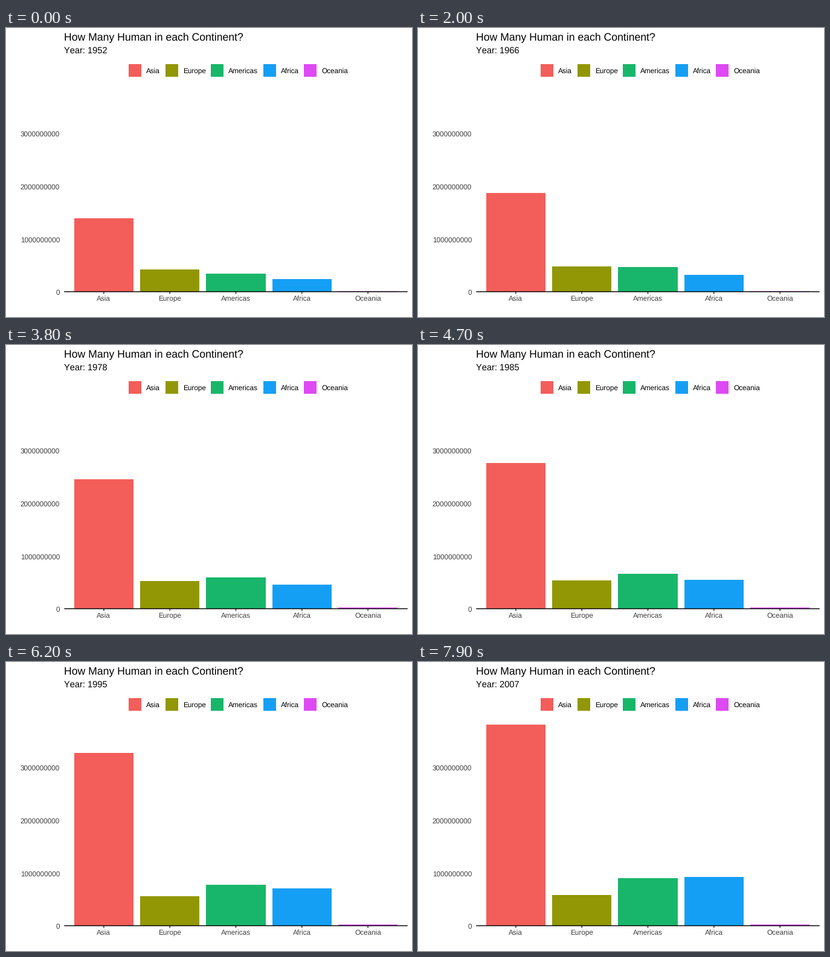
A matplotlib script for the animation above (10 s loop, 672 by 480 pixels).

```python
import matplotlib.pyplot as plt
import numpy as np
from matplotlib.animation import FuncAnimation
from matplotlib.patches import Rectangle

plt.rcParams["font.family"] = "Liberation Sans"
plt.rcParams["text.hinting"] = "none"
plt.rcParams["text.kerning_factor"] = 6  # plain advances, no pair kerning

WIDTH, HEIGHT, DPI = 672, 480, 96
FRAMES, MOVING, INTERVAL = 100, 80, 100
FIRST_YEAR, LAST_YEAR = 1952, 2007

# Name, colour, legend key position, population in millions at the key years.
# Growth between the key years follows a cubic through the four values.
KEY_YEARS = [FIRST_YEAR, 1972, 1992, LAST_YEAR]
CONTINENTS = [
    ("Asia", "#F35E5A", 203, [1395, 2140, 3126, 3812]),
    ("Europe", "#929705", 264, [418, 501, 558, 586]),
    ("Americas", "#18B66A", 339, [345, 529, 739, 899]),
    ("Africa", "#149FF5", 426, [238, 380, 659, 930]),
    ("Oceania", "#DD4AF3", 493, [10.7, 16.1, 20.9, 24.6]),
]

LEFT, RIGHT, BASE = 96.3, 664.67, 438
UNIT = (RIGHT - LEFT) / 5.2
PX_PER_MILLION = 0.0876
KEY_SIZE, LINE = 21, 1.07
LABEL_COLOR = "#404040"

fig = plt.figure(figsize=(WIDTH / DPI, HEIGHT / DPI), dpi=DPI, facecolor="white")
ax = fig.add_axes([0, 0, 1, 1])
ax.set_xlim(0, WIDTH)
ax.set_ylim(HEIGHT, 0)
ax.axis("off")


def label(x, y, text, size=8.8, color="black", ha="left"):
    return ax.text(x, y, text, fontsize=size, color=color, ha=ha, va="baseline")


def box(x, y, w, h, color):
    return ax.add_patch(Rectangle((x, y), w, h, facecolor=color, linewidth=0))


def stroke(xs, ys, color):
    ax.plot(xs, ys, color=color, lw=LINE, solid_capstyle="butt", snap=False)


def growth(values):
    """Cubic of the years since the start, through the key values."""
    return np.poly1d(np.polyfit(np.subtract(KEY_YEARS, FIRST_YEAR), values, 3))


label(96, 20, "How Many Human in each Continent?", 13.2)
year_text = label(96, 42, "", 11)

bars = []
for i, (name, color, key_x, values) in enumerate(CONTINENTS):
    box(key_x, 60, KEY_SIZE, KEY_SIZE, color)
    label(key_x + 29, 75, name)

    center = LEFT + (0.6 + i) * UNIT
    x0, x1 = round(center - 0.45 * UNIT), round(center + 0.45 * UNIT)
    bars.append((box(x0, BASE, x1 - x0, 0, color), growth(values)))
    stroke([center, center], [BASE, BASE + 3.67], "#2A2A2A")
    label(center, 453, name, color=LABEL_COLOR, ha="center")

stroke([LEFT, RIGHT], [BASE, BASE], "black")

for billions in range(4):
    y = BASE - billions * 1000 * PX_PER_MILLION
    label(89, y + 5, str(billions * 10**9), color=LABEL_COLOR, ha="right")


def update(frame):
    progress = min(frame / (MOVING - 1), 1)
    elapsed = progress * (LAST_YEAR - FIRST_YEAR)
    year_text.set_text(f"Year: {round(FIRST_YEAR + elapsed)}")
    for bar, population in bars:
        height = round(population(elapsed) * PX_PER_MILLION)
        bar.set_y(BASE - height)
        bar.set_height(height)


update(0)
anim = FuncAnimation(fig, update, frames=FRAMES, interval=INTERVAL,
                     repeat=True, repeat_delay=0, blit=False)
plt.show()
```
